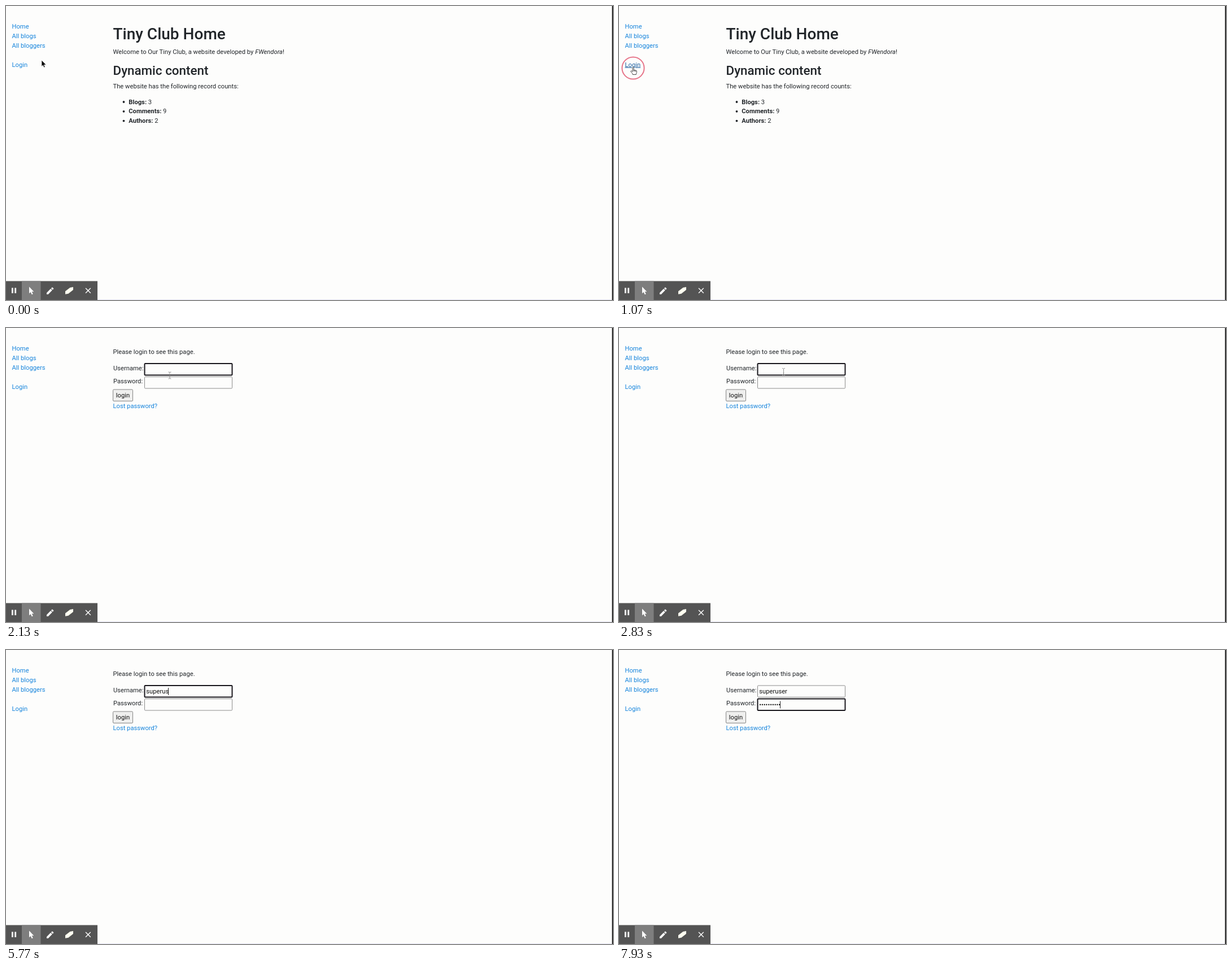
These frames come from a looping animation (1075x521 px, 8000 ms). An HTML page:

```html
<!DOCTYPE html>
<html lang="en">
<head>
<meta charset="utf-8">
<title>Login walkthrough</title>
<style>
  html, body { margin: 0; width: 100%; height: 100%; overflow: hidden; background: #fdfdfc; }
  svg { display: block; width: 1075px; height: 521px; font: 11.2px Roboto, sans-serif; fill: #212529; }
  .link { fill: #1584dc; }
  .link.hover { fill: #1c5f9f; text-decoration: underline; }
  .h1 { font-size: 28px; font-weight: 500; }
  .h2 { font-size: 22.4px; font-weight: 500; }
  .b { font-weight: 700; }
  .i { font-style: italic; }
  .field { fill: #fdfdfc; stroke: #8c8c8c; stroke-width: 1; }
  .field.focus { stroke: #18161c; stroke-width: 2; }
  .typed { fill: #111; }
</style>
</head>
<body>
<svg viewBox="0 0 1075 521">
  <rect width="1075" height="521" fill="#fdfdfc"/>
  <path d="M162 520.5H1073" stroke="#e6e5f5"/>
  <rect x="1073.3" width="1.7" height="521" fill="#171717"/>

  <g class="link">
    <text x="10.5" y="40.3">Home</text>
    <text x="10.5" y="57.1">All blogs</text>
    <text x="10.5" y="73.9">All bloggers</text>
  </g>
  <text id="loginLink" class="link" x="10.5" y="107.5">Login</text>

  <g id="homePage">
    <text class="h1" x="189.5" y="59.3">Tiny Club Home</text>
    <text x="189.5" y="85">Welcome to Our Tiny Club, a website developed by <tspan class="i">FWendora</tspan>!</text>
    <text class="h2" x="189.5" y="121.5">Dynamic content</text>
    <text x="189.5" y="145.5">The website has the following record counts:</text>
    <circle cx="208.5" cy="170" r="1.9"/>
    <circle cx="208.5" cy="186.8" r="1.9"/>
    <circle cx="208.5" cy="203.6" r="1.9"/>
    <text x="217.3" y="173.5"><tspan class="b">Blogs:</tspan> 3</text>
    <text x="217.3" y="190.3"><tspan class="b">Comments:</tspan> 9</text>
    <text x="217.3" y="207.1"><tspan class="b">Authors:</tspan> 2</text>
  </g>

  <g id="loginPage">
    <text x="189.5" y="46">Please login to see this page.</text>
    <text x="190" y="74.7">Username:</text>
    <text x="190" y="98.2">Password:</text>
    <rect id="userField" class="field" x="245.5" y="63" width="155" height="20.5" rx="1.2"/>
    <rect id="passField" class="field" x="245.5" y="86.5" width="155" height="20.5" rx="1.2"/>
    <text id="userText" class="typed" x="248.3" y="77"></text>
    <text id="passText" class="typed" x="248.3" y="100.5"></text>
    <rect id="caret" width="1" height="13" fill="#222"/>
    <rect x="189.5" y="109" width="35" height="20.5" rx="1.5" fill="#efefee" stroke="#858585"/>
    <text class="typed" x="194.8" y="123">login</text>
    <text class="link" x="189.5" y="142">Lost password?</text>
  </g>

  <g id="toolbar">
    <rect y="487.5" width="162" height="33.5" fill="#545454"/>
    <rect x="28" y="487.5" width="33.5" height="33.5" fill="#7e7e7e"/>
    <g fill="#fff">
      <path d="M10 499.5h2.8v9.5H10zM15.3 499.5h2.8v9.5h-2.8z"/>
      <path d="M41 497.5v11.8l2.7-2.3 2 4.3 2-.9-2-4.2h3.6z"/>
      <path d="M72 508.2l7.1-7.1 2.7 2.7-7.1 7.1H72zM79.9 500.3l1.4-1.4q.7-.7 1.4 0l1.3 1.3q.7.7 0 1.4l-1.4 1.4z"/>
      <path d="M105 505.5l8.5-6.5 5.5-1v5l-8.5 6.8-5.5 1z" fill="#fffff0"/>
      <path d="M141 500l8.8 8.8M149.8 500l-8.8 8.8" stroke="#fff" stroke-width="1.4"/>
    </g>
  </g>

  <circle id="ring" cx="25" cy="110" fill="none" stroke="#df4561" stroke-width="2"/>
  <g id="cursor">
    <path id="arrow" d="M0 0V11.2L2.5 8.9 4.3 13 6.2 12.2 4.4 8.2H8z" fill="#000" stroke="#fff" stroke-width=".7"/>
    <path id="hand" d="M-1 5.5V0q0-1.1 1-1.1T1 0V4q1-.7 1.9.2 1-.5 1.8.5 1.6-.2 1.6 1.3V8q0 1.5-1 2.5V12H-.8V10.7L-4 6.8q-.5-1 .4-1.4 1-.3 2.6 1.6zM1 4v2.4M2.9 4.4v2.3M4.7 4.9v2" fill="#fff" stroke="#222" stroke-width=".8"/>
    <path id="beam" d="M-2.5-6Q0-6 0-5 0-6 2.5-6M0-5V5M-2.5 6Q0 6 0 5 0 6 2.5 6M-1 2.5H1" fill="none" stroke="#888" stroke-width=".9"/>
  </g>
</svg>
<script>
const LOOP = 8000;
const PAGE_SWITCH = 1740, LINK_HOVER = [770, 1830], CLICK = 970;
const PASSWORD_FOCUS = 6270, CURSOR_HIDDEN = 4530;
const USERNAME = "superuser";
const userKeys = [4900, 5000, 5300, 5330, 5500, 5600, 5770, 5870, 6030];
const passKeys = [6600, 6730, 6970, 7030, 7170, 7270, 7400, 7570, 7680, 7900];
const caretResets = [1330, ...userKeys, PASSWORD_FOCUS, ...passKeys];

// Pointer stops: time, x, y
const pointerPath = [
  [30, 63, 96], [570, 25, 115], [730, 25, 115], [830, 25, 109.5], [1230, 25, 109.5],
  [1600, 278, 112], [1700, 278, 112], [1830, 289, 104], [2080, 289, 104],
  [2130, 290, 84], [2300, 291, 59], [2600, 291.5, 77.5]
];

const $ = id => document.getElementById(id);
const show = (id, on) => $(id).setAttribute("visibility", on ? "visible" : "hidden");
const set = (id, attrs) => {
  for (const key in attrs) $(id).setAttribute(key, attrs[key]);
};
const countBefore = (times, t) => times.filter(time => time <= t).length;
const within = (t, [from, to]) => t >= from && t < to;

function pointerAt(t) {
  const next = pointerPath.findIndex(stop => stop[0] > t);
  if (next === 0) return pointerPath[0].slice(1);
  if (next < 0) return pointerPath[pointerPath.length - 1].slice(1);
  const [t0, x0, y0] = pointerPath[next - 1], [t1, x1, y1] = pointerPath[next];
  const p = (t - t0) / (t1 - t0), eased = p * p * (3 - 2 * p);
  return [x0 + (x1 - x0) * eased, y0 + (y1 - y0) * eased];
}

function drawPointer(t) {
  const [x, y] = pointerAt(t);
  const visible = t < CURSOR_HIDDEN;
  const overLink = t >= LINK_HOVER[0] && x < 39 && y < 112;
  const overField = t >= PAGE_SWITCH && y > 62 && y < 84;
  set("cursor", { transform: `translate(${x} ${y})` });
  show("hand", visible && overLink);
  show("beam", visible && overField);
  show("arrow", visible && !overLink && !overField);

  const p = (t - CLICK) / 300;
  show("ring", p >= 0 && p < 1);
  if (p >= 0 && p < 1) set("ring", { r: 24.3 * (1 - (1 - p) ** 4), opacity: Math.min(1, 1.08 - p) });
}

function drawForm(t) {
  const onPassword = t >= PASSWORD_FOCUS;
  $("userText").textContent = USERNAME.slice(0, countBefore(userKeys, t));
  $("passText").textContent = "•".repeat(countBefore(passKeys, t));
  $("userField").classList.toggle("focus", !onPassword);
  $("passField").classList.toggle("focus", onPassword);

  const active = $(onPassword ? "passText" : "userText");
  const lastReset = caretResets[countBefore(caretResets, t) - 1];
  const caretOn = Math.floor((t - lastReset) / 500) % 2 === 0;
  set("caret", { x: Math.round(248.3 + active.getComputedTextLength() - .7), y: onPassword ? 90.5 : 67 });
  show("caret", t >= PAGE_SWITCH && caretOn);
}

function draw(t) {
  show("homePage", t < PAGE_SWITCH);
  $("loginPage").style.display = t < PAGE_SWITCH ? "none" : "";
  $("loginLink").classList.toggle("hover", within(t, LINK_HOVER));
  if (t >= PAGE_SWITCH) drawForm(t);
  drawPointer(t);
}

const start = performance.now();
function tick() {
  draw((performance.now() - start) % LOOP);
  requestAnimationFrame(tick);
}
tick();
</script>
</body>
</html>
```
